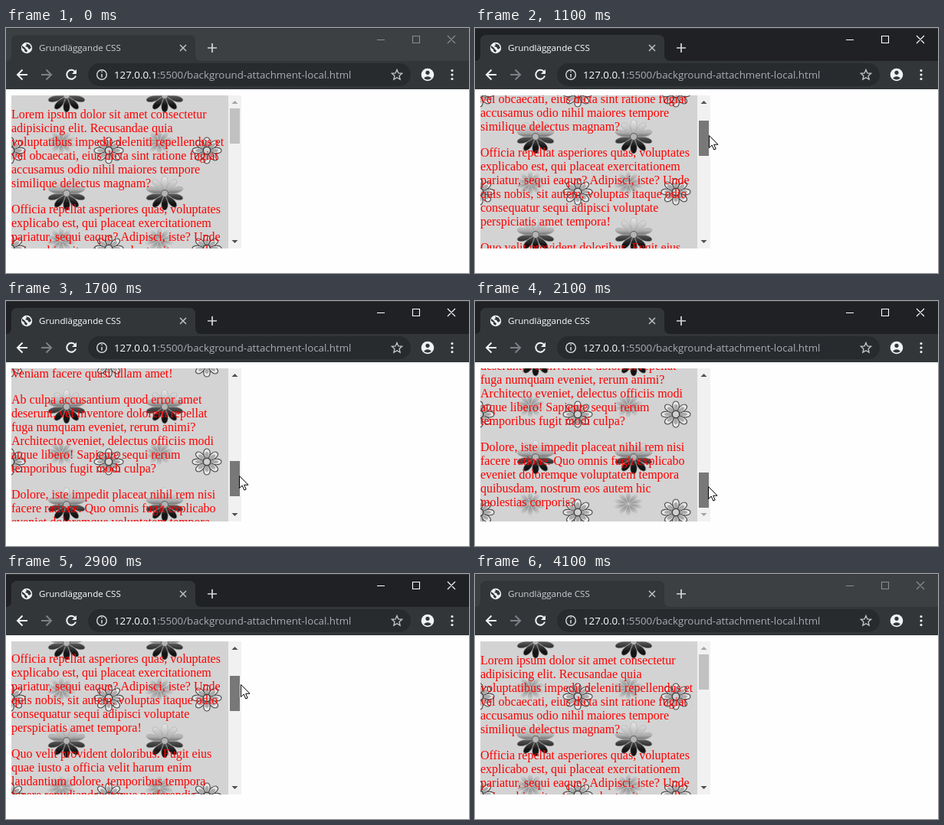
An HTML page that plays this animation: 604 by 320 pixels, repeating every 4.2 s.

```html
<!DOCTYPE html>
<html lang="sv">
<head>
<meta charset="utf-8">
<title>Background attachment</title>
<style>
  html, body { margin: 0; width: 100%; height: 100%; overflow: hidden; background: #fefefe; }
  svg { display: block; width: 604px; height: 320px; }
  .ui { font-family: "Open Sans", "Noto Sans", sans-serif; }
  .page { font: 16px "Liberation Serif", "Times New Roman", serif; fill: #f00; }
  .line { fill: none; stroke-width: 2; }
</style>
</head>
<body>
<svg viewBox="0 0 604 320" xmlns="http://www.w3.org/2000/svg">
  <defs>
    <clipPath id="view"><rect x="7" y="88" width="283" height="200"/></clipPath>
    <linearGradient id="dark" x2="0" y2="1">
      <stop offset="0" stop-color="#e9e9e9"/><stop offset=".38" stop-color="#b0b0b0"/>
      <stop offset=".56" stop-color="#4c4c4c"/><stop offset=".8" stop-color="#141414"/>
    </linearGradient>
    <radialGradient id="pale">
      <stop offset=".1" stop-color="#858585"/><stop offset="1" stop-color="#cdcdcd"/>
    </radialGradient>
    <g id="tile">
      <g transform="translate(72 0)">
        <path id="big" fill="url(#dark)" stroke="#a8a8a8" stroke-width=".6"/>
        <circle r="4.5" fill="#b4b4b4" stroke="#5c5c5c"/>
      </g>
      <path id="faded" transform="translate(65 61)" fill="url(#pale)" stroke="#cacaca" stroke-width=".6"/>
      <g transform="translate(127 72)">
        <path id="small" fill="#e8e8e8" stroke="#505050" stroke-width="1.2"/>
        <path id="inner" fill="#a9a9a9"/>
        <circle r="4.800" fill="#d0d0d0" stroke="#444" stroke-width="1.600"/>
      </g>
    </g>
  </defs>

  <rect width="604" height="320" fill="#fefefe"/>

  <rect id="frame" width="604" height="43"/>
  <rect width="604" height="1" fill="#333538"/>
  <path d="M0 43Q7 43 7 35V17Q7 9 15 9H239Q247 9 247 17V35Q247 43 255 43H604V80H0Z" fill="#323639"/>

  <g class="ui">
    <circle cx="27" cy="26" r="7.2" fill="#f1f3f4"/>
    <path d="M21 23l4 3 1 2 2 1-1 3-3-2v-2l-3-2zM26 20l5 2 2 4-3 2-2-3-3-1 2-2z" fill="#323639"/>
    <text id="tabText" x="43" y="30" font-size="11.6">Grundläggande CSS</text>
    <path d="M227 22l8 8m0-8l-8 8" class="line" stroke="#bdc1c6" style="stroke-width:1.5"/>
    <path d="M263 26h12m-6-6v12" class="line" stroke="#d5d8db" style="stroke-width:1.7"/>
    <path id="winButtons" d="M484 15.5h10M530.5 10.5h9v9h-9zM576 10l10 10m0-10l-10 10" class="line" style="stroke-width:1.1"/>

    <path d="M28 61H15m6.5-6.5L15 61l6.5 6.5" class="line" stroke="#f1f3f4"/>
    <path d="M46 61h13m-6.5-6.5L59 61l-6.5 6.5" class="line" stroke="#7d8185"/>
    <path d="M90 57A6 6 0 1 0 91 62.5" class="line" stroke="#f1f3f4"/>
    <path d="M92 54v6h-6z" fill="#f1f3f4"/>
    <rect x="107" y="46" width="421" height="30" rx="15" fill="#282b2e"/>
    <circle cx="125" cy="61" r="6.3" class="line" stroke="#d8dadd" style="stroke-width:1.4"/>
    <path d="M125 60v4.5m0-8v1.6" class="line" stroke="#d8dadd" style="stroke-width:1.5"/>
    <text x="141" y="66" font-size="13.3" fill="#a9adb2"><tspan fill="#fff">127.0.0.1</tspan>:5500/background-attachment-local.html</text>
    <path id="star" class="line" stroke="#c4c7ca" style="stroke-width:1.3"/>
    <circle cx="550" cy="61" r="8.3" fill="#f1f3f4"/>
    <circle cx="550" cy="58.3" r="2.6" fill="#323639"/>
    <path d="M545 65.5q5-4.500 10 0q-5 4-10 0z" fill="#323639"/>
    <path d="M582 55.5v0m0 5.5v0m0 5.500v0" class="line" stroke="#f1f3f4" stroke-linecap="round" style="stroke-width:3.2"/>
  </g>

  <g clip-path="url(#view)">
    <rect x="7" y="88" width="283" height="200" fill="#d3d3d3"/>
    <g id="content" class="page"></g>
  </g>

  <rect x="290" y="88" width="17" height="200" fill="#f1f1f1"/>
  <path id="up" d="M294.500 99l4-4 4 4z"/>
  <path id="down" d="M294.500 277l4 4 4-4z"/>
  <rect id="thumb" x="292" width="13" height="46"/>

  <path id="cursor" d="M.5.5V16.500L4.200 13 6.800 19 9.200 18 6.700 12.200H12z" fill="#fff" stroke="#000" stroke-linejoin="round"/>
</svg>

<script>
const $ = id => document.getElementById(id);
const LOOP = 4200, STEP = 100, MAX_SCROLL = 524, THUMB_RATIO = 4.4;

const paragraphs = [
  `Lorem ipsum dolor sit amet consectetur
adipisicing elit. Recusandae quia
voluptatibus impedit deleniti repellendus et
vel obcaecati, eius dicta sint ratione fugiat
accusamus odio nihil maiores tempore
similique delectus magnam?`,
  `Officia repellat asperiores quas, voluptates
explicabo est, qui placeat exercitationem
pariatur, sequi eaque? Adipisci, iste? Unde
quis nobis, sit autem, voluptas itaque odio
consequatur sequi adipisci voluptate
perspiciatis amet tempora!`,
  `Quo velit provident doloribus. Fugit eius
quae iusto a officia velit harum enim
laudantium dolore, temporibus tempora
facere repudiandae itaque perferendis
magni odit sapiente quisquam!`,
  `Nemo ipsam quaerat dolorum, quidem
asperiores sunt aliquid? Possimus sed
voluptate reiciendis itaque excepturi error
dolore veritatis odit ducimus perferendis
laborum earum eius nobis illo totam.
Veniam facere quasi ullam amet!`,
  `Ab culpa accusantium quod error amet
deserunt, vel inventore dolorem repellat
fuga numquam eveniet, rerum animi?
Architecto eveniet, delectus officiis modi
atque libero! Sapiente sequi rerum
temporibus fugit modi culpa?`,
  `Dolore, iste impedit placeat nihil rem nisi
facere ratione. Quo omnis fugit explicabo
eveniet doloremque voluptatem tempora
quibusdam, nostrum eos autem hic
molestias corporis?`
];

function flower(petals, rx, ry, spread) {
  const k = 1 / (0.75 * Math.cos(spread));
  const at = a => `${(rx * k * Math.sin(a)).toFixed(2)} ${(-ry * k * Math.cos(a)).toFixed(2)}`;
  let d = '';
  for (let i = 0; i < petals; i++) {
    const a = i * 2 * Math.PI / petals;
    d += `M0 0C${at(a - spread)} ${at(a + spread)} 0 0`;
  }
  return d;
}

function star(cx, cy, outer, inner) {
  const points = Array.from({ length: 10 }, (_, i) => {
    const r = i % 2 ? inner : outer, a = i * Math.PI / 5;
    return `${cx + r * Math.sin(a)} ${cy - r * Math.cos(a)}`;
  });
  return `M${points.join('L')}Z`;
}

function buildContent() {
  let html = '';
  for (let row = 0; row < 7; row++)
    for (let col = -1; col < 3; col++)
      html += `<use href="#tile" x="${7 + col * 128}" y="${88 + row * 128}"/>`;
  let y = 118;
  for (const p of paragraphs) {
    for (const line of p.split('\n')) {
      html += `<text x="7" y="${y}">${line}</text>`;
      y += 18;
    }
    y += 16;
  }
  $('content').innerHTML = html;
}

const progress = (t, from, to) => Math.min(1, Math.max(0, (t - from) / (to - from)));

// The drag down eases both ways; the drag back starts fast and settles slowly
function scrollAt(t) {
  if (t < 2300) {
    const u = progress(t, 710, 2063), rest = 1 - u;
    return MAX_SCROLL * u * u / (u * u + rest * rest);
  }
  return MAX_SCROLL * (1 - progress(t, 2300, 3300) ** 1.4) ** 2.12;
}

function cursorAt(t, scroll) {
  if (t < 700) {
    const rest = (1 - progress(t, 100, 600)) ** 2;
    return [310 + 264 * rest, 115 - 104 * rest];
  }
  if (t < 2300) return [305.3 - scroll / 300, 123 + scroll / THUMB_RATIO];
  if (t < 3500) return [308.4 - scroll / 45, 113.4 + scroll * 0.243];
  const u = progress(t, 3500, 3900);
  return [335 + 243 * u, 113 - 67 * u ** 9];
}

const set = (id, name, value) => $(id).setAttribute(name, value);

function render(time) {
  const t = Math.floor(time % LOOP / STEP) * STEP;
  const active = t >= 700 && t < 4100;
  const dragging = t >= 700 && t < 3500;
  const scroll = Math.round(scrollAt(t));
  const arrow = on => on ? '#505050' : '#a3a3a3';

  set('frame', 'fill', active ? '#202124' : '#3c4043');
  set('tabText', 'fill', active ? '#fff' : '#ced1d5');
  set('winButtons', 'stroke', active ? '#fff' : '#8b8e91');
  set('content', 'transform', `translate(0 ${-scroll})`);
  set('thumb', 'y', 105 + Math.floor(scroll / THUMB_RATIO));
  set('thumb', 'fill', dragging ? '#787878' : '#c1c1c1');
  set('up', 'fill', arrow(scroll > 0));
  set('down', 'fill', arrow(scroll < MAX_SCROLL));
  set('cursor', 'transform', `translate(${cursorAt(t, scroll).map(Math.round)})`);
  set('cursor', 'visibility', t >= 100 && t < 4000 ? 'visible' : 'hidden');
}

set('big', 'd', flower(10, 25, 22, 0.42));
set('faded', 'd', flower(10, 19, 15, 0.42));
set('small', 'd', flower(8, 19, 17, 0.52));
set('inner', 'd', flower(8, 15, 13, 0.42));
set('star', 'd', star(510, 61.5, 7, 3.2));
buildContent();

const start = performance.now();
function tick() {
  render(performance.now() - start);
  requestAnimationFrame(tick);
}
tick();
</script>
</body>
</html>
```
